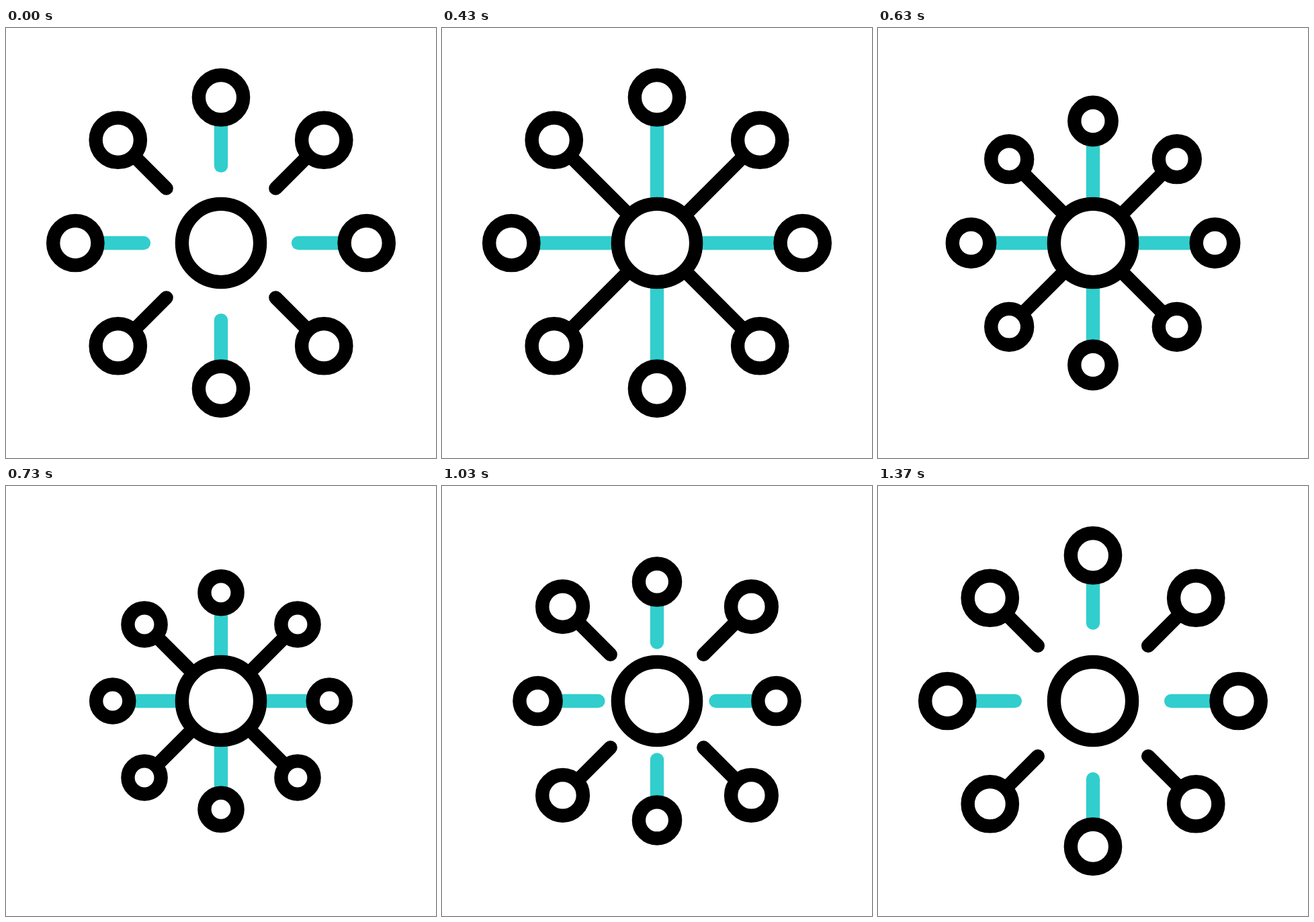
These frames come from a looping animation (640 by 640 pixels, 1670 ms). An HTML page with a canvas:

```html
<!DOCTYPE html>
<html lang="en">
<head>
<meta charset="utf-8">
<title>Hub and nodes</title>
<style>
  html, body { margin: 0; height: 100%; overflow: hidden; background: #fff; }
  canvas { display: block; }
</style>
</head>
<body>
<canvas width="640" height="640"></canvas>
<script>
const ctx = document.querySelector('canvas').getContext('2d');
const LOOP = 1670, STROKE = 20.4;
const REST = 216.7, NODE_R = 33.15, HUB_R = 58.1;
const TIP_OUT = 116.2, TIP_IN = 60.4;

// Spokes at even indices are straight, odd ones diagonal. Times in frames.
const straight = { color: '#31cecd', travel: 76.5, arrive: 25, rest: 41 };
const diagonal = { color: '#000', travel: 55.5, arrive: 21, rest: 36 };
const PULL_START = 13, PUSH_START = 25;

const progress = (f, from, to) => Math.min(1, Math.max(0, (f - from) / (to - from)));

function ring(x, radius) {
  ctx.beginPath();
  ctx.arc(x, 0, radius, 0, Math.PI * 2);
  ctx.fillStyle = '#fff';
  ctx.fill();
  ctx.strokeStyle = '#000';
  ctx.stroke();
}

function spoke(group, f) {
  const pushing = f >= PUSH_START;
  const pull = pushing
    ? (1 - progress(f, PUSH_START, group.rest)) ** 1.42
    : progress(f, PULL_START, group.arrive) ** 1.12;
  const reach = pushing ? pull : progress(f, -1, PULL_START) ** 1.48;
  const shift = group.travel * pull;
  const x = REST - shift;

  ctx.strokeStyle = group.color;
  ctx.beginPath();
  ctx.moveTo(TIP_OUT + (TIP_IN - TIP_OUT) * reach, 0);
  ctx.lineTo(x - 20, 0);
  ctx.stroke();
  ring(x, NODE_R - shift * 0.154);
}

function draw(now) {
  // 30 frames per second, on a 10 ms clock
  const f = Math.floor((Math.floor(now % LOOP / 10) + 0.4) * 0.3);
  ctx.setTransform(1, 0, 0, 1, 0, 0);
  ctx.clearRect(0, 0, 640, 640);
  ctx.translate(320, 320);
  ctx.lineWidth = STROKE;
  ctx.lineCap = 'round';
  for (let i = 0; i < 8; i++) {
    spoke(i % 2 ? diagonal : straight, Math.min(f, 49));
    ctx.rotate(Math.PI / 4);
  }
  ring(0, HUB_R);
}

function tick(now) {
  draw(now);
  requestAnimationFrame(tick);
}
draw(0);
requestAnimationFrame(tick);
</script>
</body>
</html>
```
